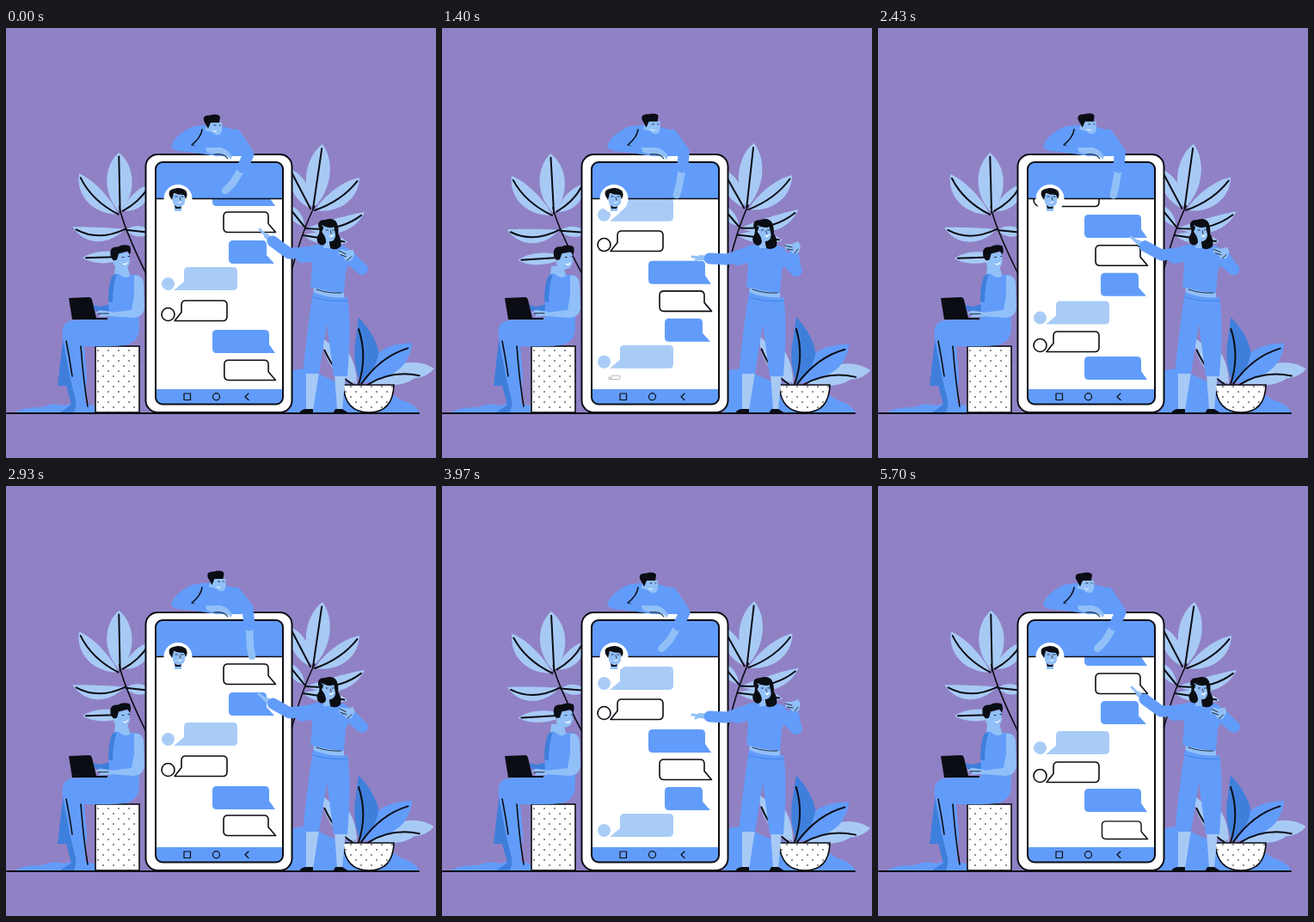
Recreate the animation shown at these times as an HTML page. Size 500 px wide and 500 px high, loop 5730 ms.

```html
<!DOCTYPE html>
<html lang="en">
<head>
<meta charset="utf-8">
<title>Chat illustration</title>
<style>
html, body { margin: 0; width: 100%; height: 100%; overflow: hidden; background: #9081c5; }
svg { display: block; width: 100%; height: 100%; }
.blue { fill: #629cfa; }
.dark { fill: #3f7fdc; }
.light { fill: #a7caf5; }
.skin { fill: #91c0f8; }
.white { fill: #fff; }
.ink { fill: #0b0d14; }
.line { fill: none; stroke: #0b0d14; stroke-width: 1.6; stroke-linecap: round; stroke-linejoin: round; }
.vein { stroke-width: 2; }
.thin { stroke-width: .8; }
.edge { stroke: #0b0d14; stroke-width: 1.6; }
.limb { fill: none; stroke-linecap: round; stroke-linejoin: round; }
</style>
</head>
<body>
<svg id="stage" viewBox="0 0 500 500">
  <defs>
    <pattern id="dots" width="12" height="12" patternUnits="userSpaceOnUse" x="104" y="372">
      <rect width="12" height="12" fill="#fff"/>
      <circle cx="3" cy="3" r=".8"/><circle cx="9" cy="9" r=".8"/>
    </pattern>
    <clipPath id="feed"><rect x="175" y="199" width="146" height="221"/></clipPath>
    <clipPath id="screen"><rect x="174" y="156" width="148" height="281.5" rx="8"/></clipPath>
  </defs>

  <path class="blue" d="M328 447V400Q346 392 364 402Q385 414 402 414Q440 418 460 433Q474 436 481 447Z"/>
  <path class="blue" d="M10 447Q22 440 42 441Q54 435 68 439Q85 432 104 440V447Z"/>
  <g id="plantLeft"></g>
  <g id="plantRight"></g>
  <g id="potLeaves">
    <path class="light" d="M405 415Q403 386 368 359Q370 398 405 415ZM408 414Q408 388 395 372Q391 398 408 414Z"/>
    <path class="light" d="M498 397Q480 385 456 392Q434 400 424 415Q460 419 475 408Q490 407 498 397Z"/>
    <path class="blue" d="M473 367Q442 367 428 383Q417 397 415 413Q446 409 462 393Q471 382 473 367Z"/>
    <path class="dark" d="M411 336Q430 356 434 377Q430 400 413 414Q404 394 406 372Z"/>
    <path class="line vein" d="M411 350Q421 382 410 414M468 373Q436 382 413 414M481 405Q448 398 420 415M371 374Q383 402 403 414"/>
  </g>
  <path d="M392 415H451Q450 447 422 447Q394 447 392 415Z" fill="url(#dots)" class="edge"/>

  <g id="phone">
    <rect class="white" x="162.5" y="147" width="170" height="300" rx="14" stroke="#0b0d14" stroke-width="2"/>
    <g clip-path="url(#screen)">
      <rect class="white" x="174" y="156" width="148" height="282"/>
      <rect class="blue" x="174" y="156" width="148" height="42"/>
      <rect class="blue" x="174" y="420" width="148" height="18"/>
    </g>
    <g id="messages" clip-path="url(#feed)"></g>
    <path class="line" d="M174 198.5H322"/>
    <rect x="174" y="156" width="148" height="281.5" rx="8" fill="none" stroke="#0b0d14" stroke-width="2"/>
    <g class="line" style="stroke-width:1.2">
      <rect x="207" y="425" width="7.5" height="7.5"/><circle cx="244.5" cy="428.7" r="4"/><path d="M282 425L278 428.7L282 432.5"/>
    </g>
    <circle class="white" cx="200" cy="198.5" r="16.5"/>
    <path class="skin" d="M193 193H208V203Q206 207 204 207V213H196V207Q193 203 193 193Z"/>
    <path class="ink" d="M190 195Q188 188 195 187Q203 184 209 189Q212 193 209 199L207 194Q200 194 195 192L193 200ZM196 206Q200 210 204 207L203 210H197Z"/>
    <path class="white" d="M198 202Q202 204 205 201Q203 206 198 202Z"/>
    <path class="line thin" d="M197 196H199M204 196H206M202 197L203 200"/>
  </g>

  <g id="climber">
    <path class="blue" d="M192 139Q194 126 216 115Q238 110 258 116Q276 121 286 142L278 149H246L197 142Z"/>
    <g id="climberHead">
      <path class="skin" d="M236 108L251 110L251 119Q250 126 243 124L239 121L231 119Z"/>
      <path class="ink" d="M230 108Q228 101 237 101.5Q246 99 249 103L248 110L238 110L235 117Z"/>
      <path class="white" d="M239 118Q243 121 246 119Q243 123 239 118Z"/>
      <path class="line thin" d="M242 113H244M248 113H249"/>
    </g>
    <path class="line" d="M228 118Q227 127 216 136Q222 140 229 141"/>
    <path class="blue" d="M193 137Q195 132 202 134L236 140L238 146L199 143Z"/>
    <path class="skin" d="M232 139L250 139Q260 142 263 150L261 153L257 148L258 153L253 148L234 145Z"/>
    <path class="line" style="stroke-width:1" d="M242 147Q254 145 258 152"/>
    <path id="climberHand" class="limb" stroke="#91c0f8" stroke-width="8.5"/>
    <path id="climberSleeve" class="limb" stroke="#629cfa" stroke-width="13"/>
  </g>

  <rect x="104" y="370" width="51" height="77" fill="url(#dots)" class="edge"/>
  <g id="typist">
    <path class="dark" d="M67 355L60 416H70L76 438L63 447H81L82 380Z"/>
    <path class="blue" d="M121 337L154 341Q158 362 142 368Q132 371 91 370L94 405L91 447H79L82 437L74 404L66 361Q63 341 78 340Z"/>
    <path class="line" d="M87 370Q90 410 95 440M70 364Q74 384 77 405"/>
    <path class="skin" d="M127 277L141 276L144 287L157 290L153 300H125Z"/>
    <path class="dark" d="M121 321L110 324L101 322L104 329L121 330Z"/>
    <path class="blue" d="M124 288Q130 283 134 288Q141 293 145 287L154 287L155 343H121Q117 311 124 288Z"/>
    <path class="dark" d="M124 288Q119 296 119 318L124 319Q124 300 129 286Z"/>
    <g id="typistHead">
      <path class="skin" d="M127 263L143 261L144 272Q143 280 136 281L130 282L125 275Z"/>
      <path class="ink" d="M122 267Q119 254 130 255Q137 251 144 254Q146 259 144 264L141 260L131 263L129 270L125 271Z"/>
      <path class="white" d="M134 274Q139 276 142 272Q140 279 134 274Z"/>
      <path class="line thin" d="M135 267H137M142 266H143"/>
    </g>
    <path class="skin" d="M149 288Q159 286 160 298L161 326Q159 337 148 337L121 335L121 331L146 328L149 311Z"/>
    <g id="hands">
      <path class="skin" d="M123 330L109 328L103 332L110 332L108 336L123 335Z"/>
      <path class="line thin" d="M107 332L119 332"/>
    </g>
    <path class="ink" d="M73 314L97 313Q99 313 100 316L105 337H118V339H77Z"/>
  </g>

  <g id="presenter">
    <path class="light" d="M349 400H364L357 445H349ZM382 402H395L391 444H385Z"/>
    <path class="ink" d="M341 448Q343 443 350 443H357V448ZM380 448L383 443H391L399 448Z"/>
    <path class="skin" d="M358 298H393V316H357Z"/>
    <path class="blue" d="M357 307Q375 315 397 313Q402 340 397 405H381L373 344L364 402H345Q351 344 357 307Z"/>
    <path class="line" style="stroke-width:1;stroke:#3f82e3" d="M357 313Q375 319 397 317"/>
    <path id="raisedArm" class="limb" stroke="#629cfa" stroke-width="14"/>
    <path class="blue" d="M354 254Q364 249 374 255Q386 249 398 256Q402 269 395 283L393 308Q375 307 354 301L356 278Z"/>
    <path class="line thin" d="M361 304Q376 309 390 308"/>
    <path id="raisedSleeve" class="limb" stroke="#629cfa" stroke-width="12"/>
    <g id="raisedHand">
      <path class="skin" d="M-9 -4L-1 -4L6 -7L9 -2L7 6L1 8L-4 3L-9 3Z"/>
      <path class="line thin" d="M-9 -2L-1 0M-7 2L0 3M2 7L6 2"/>
    </g>
    <g id="presenterHead">
      <path class="ink" d="M363 232Q361 223 371 223Q380 220 384 226Q387 233 386 239Q391 247 389 254Q384 259 377 256L374 238Z"/>
      <path class="skin" d="M367 229Q376 234 381 231L383 241Q382 249 375 248L377 256H369L370 243Z"/>
      <path class="ink" d="M367 237Q372 243 372 249Q370 254 365 252Q360 249 362 242Q365 240 364 230L369 231Z"/>
      <path class="white" d="M374 241Q378 243 381 239Q380 246 374 241Z"/>
      <path class="line thin" d="M372 235H374M379 235H381M377 236L378 239"/>
    </g>
    <path id="pointHand" class="limb" stroke="#91c0f8" stroke-width="6"/>
    <path id="pointFinger" class="limb" stroke="#91c0f8" stroke-width="3"/>
    <path id="pointArm" class="limb" stroke="#629cfa" stroke-width="13"/>
    <path id="upperArm" class="limb" stroke="#629cfa" stroke-width="18"/>
  </g>
  <path class="line" style="stroke-width:2" d="M1 448H480"/>
</svg>
<script>
const LOOP = 5730, CHAT = LOOP / 2, REACH = LOOP / 3;
const $ = id => document.getElementById(id);
const lerp = (a, b, k) => a + (b - a) * k;
const smooth = k => k * k * (3 - 2 * k);
const clamp = k => Math.max(0, Math.min(1, k));
const mix = (a, b, k) => a.map((v, i) => lerp(v, b[i], k));
const poly = (...pts) => 'M' + pts.map(p => p.map(v => v.toFixed(2)).join(' ')).join('L');
const set = (id, name, value) => $(id).setAttribute(name, value);

function track(keys, t) {
  const i = keys.findIndex(k => k[0] > t);
  if (i < 0) return keys[keys.length - 1][1];
  if (i === 0) return keys[0][1];
  const [t0, a] = keys[i - 1], [t1, b] = keys[i];
  return lerp(a, b, smooth((t - t0) / (t1 - t0)));
}

// A leaf runs from base to tip; bend bows it sideways, the vein stops short of the tip.
function leaf(bx, by, tx, ty, w, bend = 0) {
  const dx = tx - bx, dy = ty - by, len = Math.hypot(dx, dy);
  const nx = -dy / len, ny = dx / len;
  const at = (along, side) => `${(bx + dx * along + nx * side).toFixed(1)} ${(by + dy * along + ny * side).toFixed(1)}`;
  return `<path class="light" d="M${bx} ${by}C${at(.3, w + bend)} ${at(.76, w + bend)} ${tx} ${ty}` +
    `C${at(.76, bend - w)} ${at(.3, bend - w)} ${bx} ${by}Z"/>` +
    `<path class="line vein" d="M${bx} ${by}Q${at(.5, bend * 1.6)} ${at(.93, bend * .3)}"/>`;
}
const stem = d => `<path class="line" d="${d}"/>`;

$('plantLeft').innerHTML = leaf(132, 215, 130, 145, 19.5) + leaf(130, 217, 84, 170, 14, -7) +
  leaf(138, 234, 77, 232, 11, -10) + leaf(143, 266, 89, 268, 9) +
  leaf(135, 213, 166, 182, 11, 4) + leaf(139, 235, 168, 238, 8) +
  stem('M131 208Q136 232 164 288');
$('plantRight').innerHTML = leaf(357, 210, 368, 135, 18) + leaf(359, 212, 411, 174, 14, 6) +
  leaf(349, 233, 417, 214, 11, 9) + leaf(345, 241, 397, 249, 9) +
  leaf(354, 210, 330, 164, 12) + leaf(347, 231, 326, 205, 8) +
  stem('M359 207Q344 236 330 290');

// Chat poses: pose index over one chat cycle, five poses per cycle.
const scrollKeys = [[0, 0], [65, 1], [260, 1], [500, 1.5], [580, 1.5], [860, 2], [1250, 2],
  [1600, 3], [1980, 3], [2330, 3.5], [2700, 3.5], [2835, 4], [CHAT, 5]];
const kinds = [
  { x: 207, end: 269, tail: 195, h: 27, fill: '#a9ccf6', born: 600, grow: 250, first: 2,
    ys: [381, 350, 285, 278, 275, 210, 179] },
  { x: 204, end: 257, tail: 196, h: 23.5, born: 1320, grow: 300, first: 3,
    ys: [385, 321, 317, 314, 248, 218, 150] },
  { x: 240, end: 306, tail: 313, h: 27, fill: '#629cfa', born: 2000, grow: 300, first: 3,
    ys: [412, 352, 351, 349, 283, 252, 182, 180, 172, 140] },
  { x: 253, end: 305, tail: 313.5, h: 23.5, born: 2680, grow: 200, first: 4,
    ys: [387, 386, 383, 318, 287.5, 218, 214, 207, 140] },
  { x: 259, end: 303, tail: 312, h: 27, fill: '#629cfa', born: 280, grow: 240, first: 1,
    ys: [414, 350, 319.5, 250, 247, 240, 172] }
];

function bubble({ x, end, tail, h, fill }) {
  const paint = fill ? `fill="${fill}"` : 'fill="#fff" class="edge" stroke-linejoin="round"';
  const right = tail > end, r = 5;
  const shape = right
    ? `M${x + r} 0H${end - r}Q${end} 0 ${end} ${r}V${h - 10}L${tail} ${h}H${x + r}Q${x} ${h} ${x} ${h - r}V${r}Q${x} 0 ${x + r} 0Z`
    : `M${x + r} 0H${end - r}Q${end} 0 ${end} ${r}V${h - r}Q${end} ${h} ${end - r} ${h}H${tail}L${x} ${h - 10}V${r}Q${x} 0 ${x + r} 0Z`;
  return `<path ${paint} d="${shape}"/>` + (right ? '' : `<circle ${paint} cx="188.5" cy="${h - 7.5}" r="7.5"/>`);
}

const messages = [];
for (const kind of kinds) for (let cycle = 0; cycle < 3; cycle++) {
  const node = document.createElementNS('http://www.w3.org/2000/svg', 'g');
  node.innerHTML = bubble(kind);
  $('messages').append(node);
  messages.push({ kind, cycle, node });
}

function drawMessages(local) {
  const pose = track(scrollKeys, local);
  for (const { kind, cycle, node } of messages) {
    const { ys, first, born, grow, tail, h } = kind;
    const p = pose + 5 * cycle - first;
    const scale = smooth(clamp((local + cycle * CHAT - born) / grow));
    const shown = scale > 0 && p < ys.length - 1;
    node.setAttribute('visibility', shown ? 'visible' : 'hidden');
    if (!shown) continue;
    const i = Math.max(0, Math.floor(p));
    const y = lerp(ys[i], ys[i + 1], Math.max(0, p - i));
    node.setAttribute('transform', `translate(${tail} ${y + h}) scale(${scale}) translate(${-tail} ${-h})`);
  }
}

function drawClimber(t) {
  const k = smooth((1 - Math.cos(t / REACH * 2 * Math.PI)) / 2);
  const shoulder = [267, 124], elbow = mix([282, 147], [281, 142], k), cuff = mix([275, 162], [283, 162], k);
  const wrist = mix([264, 180], [284, 187], k), tip = mix([255, 189], [286, 198], k);
  set('climberSleeve', 'd', poly(shoulder, elbow, cuff));
  set('climberHand', 'd', poly(cuff, wrist, tip));
  set('climberHead', 'transform', `translate(${4.5 * k} ${-2 * k})`);
}

const pointKeys = [[0, 1], [65, .75], [500, 0], [1930, 0], [2700, 1], [CHAT, 1]];
const chestKeys = [[0, 1], [65, .97], [600, 0], [1930, 0], [2700, 1], [CHAT, 1]];
function drawPresenter(local) {
  const k = track(pointKeys, local), c = track(chestKeys, local);
  const elbow = mix([331, 269], [329, 262], k), cuff = mix([311, 268], [310, 248], k);
  const palm = mix([300, 267], [303, 242], k), tip = mix([291, 266], [295, 234], k);
  set('upperArm', 'd', poly([360, 262], mix([344, 267], [345, 264], k)));
  set('pointArm', 'd', poly([358, 261], elbow, cuff));
  set('pointHand', 'd', poly(cuff, palm));
  set('pointFinger', 'd', poly(palm, tip) + poly(palm, [tip[0] + 4, tip[1] + 4]));
  const bend = mix([412, 282], [414, 280], c), wrist = mix([409, 264], [402, 267], c);
  set('raisedArm', 'd', poly([393, 262], bend));
  set('raisedSleeve', 'd', poly(bend, wrist));
  const [hx, hy] = mix([408, 255], [396, 263], c);
  set('raisedHand', 'transform', `translate(${hx} ${hy}) rotate(${lerp(0, 12, c)})`);
  set('presenterHead', 'transform', `rotate(${lerp(-1, 1, k)} 374 255)`);
}

const lookKeys = [[900, 0], [1080, 1], [2100, 1], [2500, 0]];
function drawTypist(t, local) {
  const look = track(lookKeys, local);
  set('typistHead', 'transform', `translate(${7.5 * look} -.5) rotate(${3 * look} 134 280)`);
  set('hands', 'transform', `translate(0 ${Math.sin(t / LOOP * 24 * Math.PI) * .8})`);
}

function draw(t) {
  const local = t % CHAT;
  const sway = Math.cos(local / CHAT * 2 * Math.PI);
  drawMessages(local);
  drawClimber(t);
  drawPresenter(local);
  drawTypist(t, local);
  set('plantLeft', 'transform', `rotate(${sway - .5} 163 288)`);
  set('plantRight', 'transform', `rotate(${sway - 1} 331 290)`);
  set('potLeaves', 'transform', `rotate(${-sway * .8} 420 415)`);
}

function frame(now) {
  draw(now % LOOP);
  requestAnimationFrame(frame);
}
draw(0);
requestAnimationFrame(frame);
</script>
</body>
</html>
```
